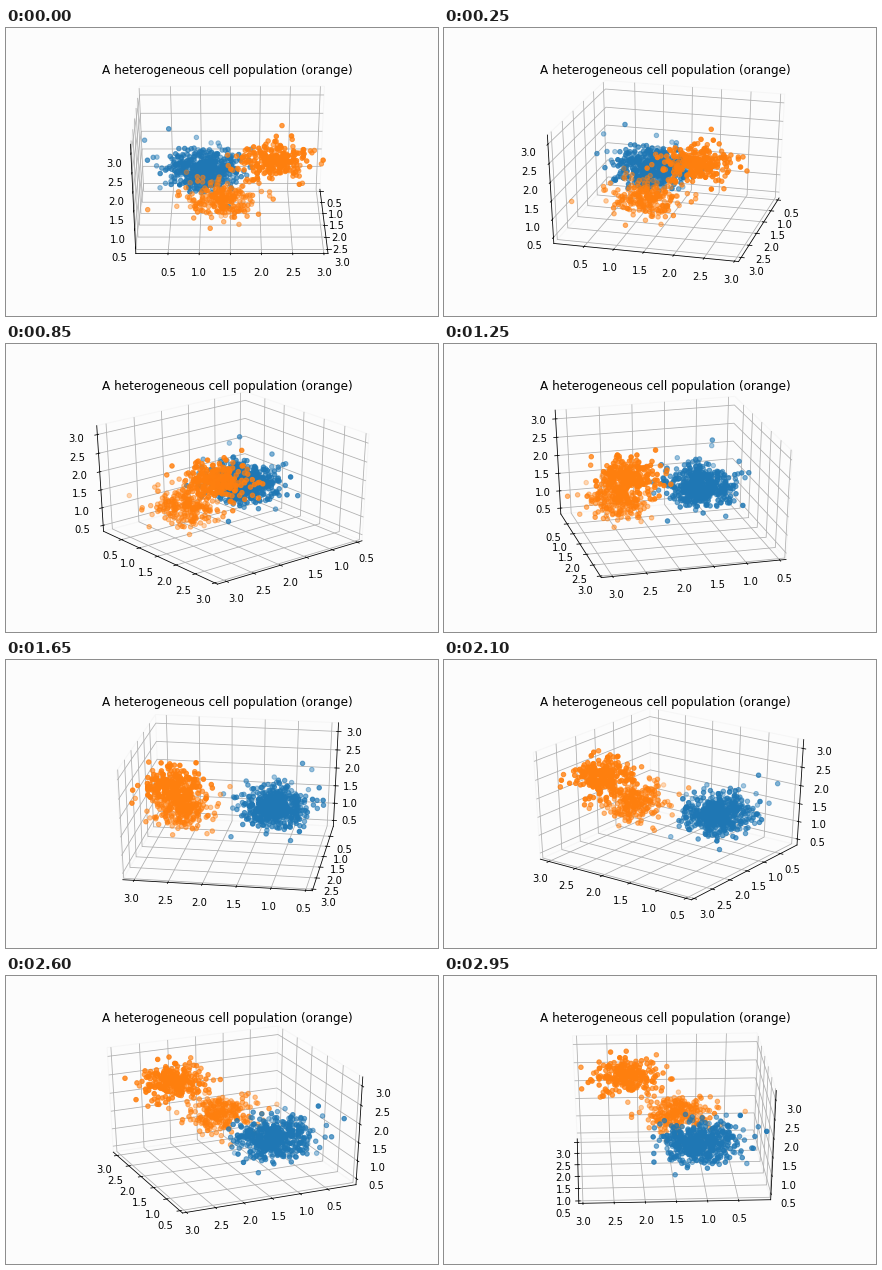
These frames come from a looping animation (432x288 px, 3000 ms). A matplotlib script:

```python
import numpy as np
import matplotlib.pyplot as plt
from matplotlib.animation import FuncAnimation

FRAMES, INTERVAL, STEP = 60, 50, 3
PAPER, PANE_EDGE = "#fcfcfc", "#f6f6f6"
SPREAD = np.array([0.20, 0.27, 0.21])

plt.rcParams.update({"font.family": "DejaVu Sans", "text.kerning_factor": 6})
rng = np.random.default_rng(11)


def blob(center, count, scale=1.0):
    return rng.normal(center, SPREAD * scale, (count, 3))


def frame_axis(axis, set_lim, low, high):
    pad = (high - low) / 48
    set_lim(low - pad, high + pad)
    axis.set_ticks(np.arange(0.5, 3.1, 0.5))
    axis.set_major_formatter("{x:.1f}")
    axis.set_pane_color(PAPER)
    axis.pane.set_edgecolor(PANE_EDGE)


fig = plt.figure(figsize=(6, 4), dpi=72, facecolor=PAPER)
ax = fig.add_axes([0.125, 0.125, 0.775, 0.755], projection="3d",
                  facecolor=PAPER)
# Let the cube fill the wide axes instead of a centred square
ax.apply_aspect = lambda position=None: None
ax.set_box_aspect((1, 1, 1), zoom=np.sqrt(3) / 1.8294640721620434)

# One uniform population, and one made of two clusters; each has a stray cell
uniform = np.vstack([blob((1.2, 1.07, 1.4), 500, 1.15), (0.87, 0.47, 2.33)])
mixed = np.vstack([blob((2.55, 2.18, 2.46), 250), blob((2.53, 1.33, 1.4), 250),
                   (2.78, 0.18, 1.28)])
for cells, color in ((uniform, "C0"), (mixed, "C1")):
    ax.scatter(*cells.T, color=color)

frame_axis(ax.xaxis, ax.set_xlim, 0.459, 3.109)
frame_axis(ax.yaxis, ax.set_ylim, 0.045, 3.005)
frame_axis(ax.zaxis, ax.set_zlim, 0.386, 3.176)

ax.text2D(0.5, 0.9476, "A heterogeneous cell population (orange)",
          transform=ax.transAxes, ha="center", va="baseline", fontsize=12)


def update(i):
    # the tiny offset settles which wall is hidden at right angles
    ax.view_init(elev=30, azim=STEP * i + 1e-3)
    return []


anim = FuncAnimation(fig, update, frames=FRAMES, interval=INTERVAL,
                     init_func=lambda: update(0), repeat=True, repeat_delay=0)
plt.show()
```
